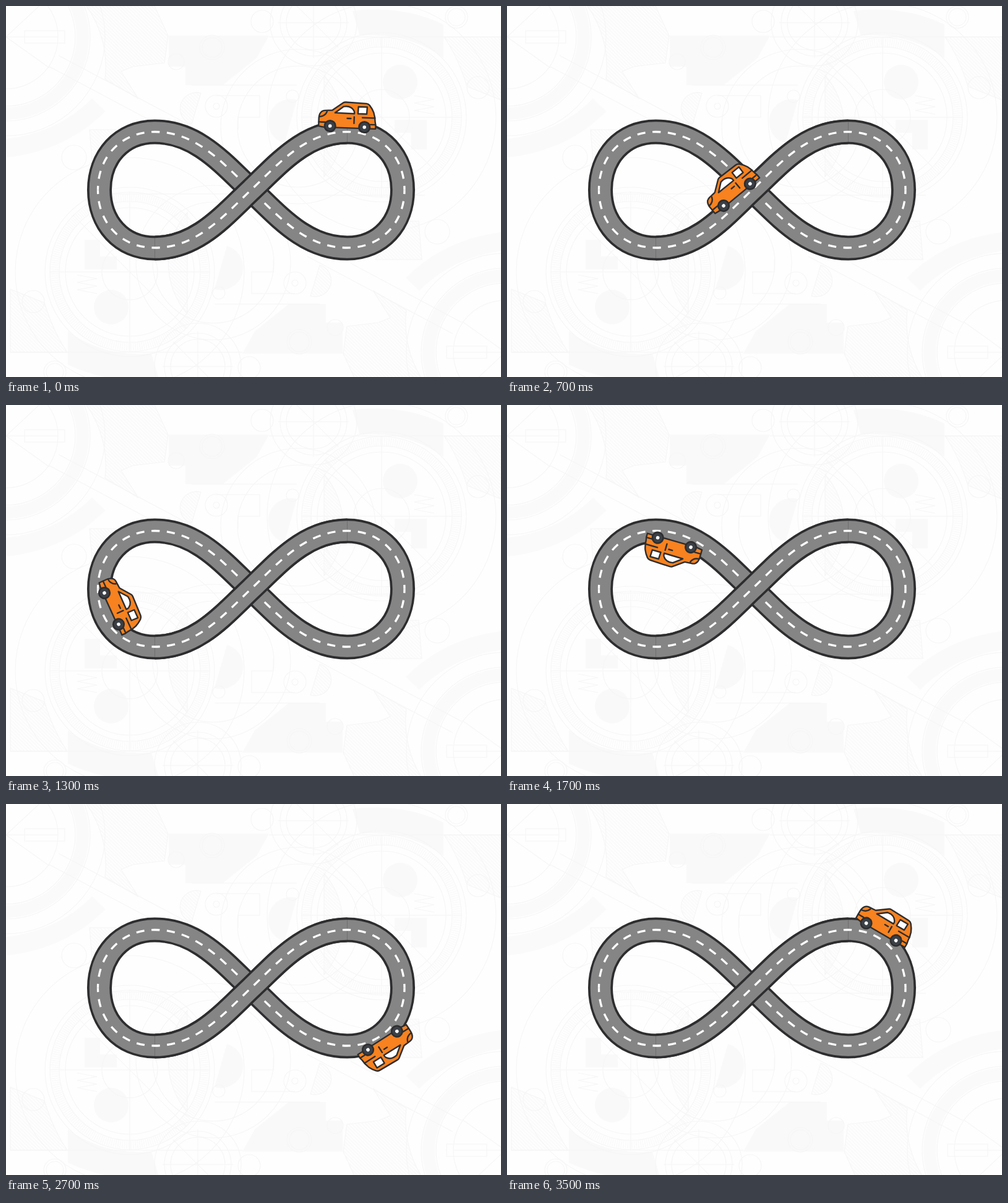
An HTML page for the animation above (3600 ms loop, 800x600 px).

```html
<!DOCTYPE html>
<html lang="en">
<head>
<meta charset="utf-8">
<title>Endless road</title>
<style>
  html, body { margin: 0; width: 100%; height: 100%; overflow: hidden; background: #fefefe; }
  svg { display: block; width: 800px; height: 600px; }
  .edge { fill: none; stroke: #2d2d2f; stroke-width: 40; }
  .tar { fill: none; stroke: #858585; stroke-width: 32.6; }
  .dash { fill: none; stroke: #fff; stroke-width: 3.3; stroke-dasharray: .53 .47; stroke-dashoffset: .265; }
  #car { stroke: #2d2d2f; stroke-width: 2.4; stroke-linejoin: round; stroke-linecap: round; }
  .body { fill: #f7821f; }
  .glass { fill: #fff; }
  .line { fill: none; }
  .tyre { fill: #3b4047; stroke-width: 2.6; }
  .hub { fill: #fff; stroke: none; }
  #gears { fill: none; stroke: #f6f6f6; stroke-width: 1.2; }
  #gears .fill { fill: #f9f9f9; stroke: none; }
  #gears .hatch { fill: url(#lines); }
  #gears .ring { stroke: #fafafa; }
</style>
</head>
<body>
<svg viewBox="0 0 800 600">
  <defs>
    <pattern id="lines" width="4" height="4" patternUnits="userSpaceOnUse" patternTransform="rotate(45)">
      <path d="M0 2H4" stroke="#f7f7f7" stroke-width="1.2"/>
    </pattern>
    <g id="gears">
      <path class="hatch" d="M130 0H240L262 48L256 92L205 98L186 106L214 150L160 118A170 170 0 0 0 130 0Z"/>
      <path class="hatch" d="M708 50H800V152L745 130Q730 82 708 50Z"/>
      <path class="hatch" d="M514 112A125 125 0 0 1 514 276Z"/>
      <path class="hatch" d="M315 141A26 26 0 1 0 300 191Z"/>
      <path class="hatch" d="M135 200H210L165 262H140Z"/>
      <path class="fill" d="M263 48H425L405 84L350 128H290V98H263Z"/>
      <path class="fill" d="M560 8Q640 -2 707 30V84Q650 42 572 48Z"/>
      <path class="fill" d="M628 184H680V232H655V205H628Z"/>
      <path class="fill" d="M470 152A36 36 0 0 0 450 222Z"/>
      <circle class="fill" cx="637" cy="123" r="28"/>
      <circle class="ring" cx="0" cy="50" r="124" stroke-width="20"/>
      <path class="ring" d="M0 230Q90 220 150 160" stroke-width="30"/>
      <path d="M85 80L320 205M70 98L250 194M0 50L60 -6M0 50L70 100M0 50H84M30 40H95V60H30Z"/>
      <path d="M425 50H800M300 128H470M130 304H400M340 145H410V180H375V200M660 145l32 6l-32 6l32 6l-32 6l32 6"/>
      <path d="M607 50V310M477 180H737M515 88L699 272M497 -30V84M440 27H554M457 -13L537 67"/>
      <circle class="ring" cx="607" cy="180" r="121" stroke-width="13" stroke-dasharray="1.5 2"/>
    </g>
  </defs>
  <use href="#gears"/>
  <use href="#gears" transform="rotate(180 403.5 305)"/>

  <path id="route" fill="none" d="M551.5 203.5C484 203.5 441 255 396 297.5S308 391.5 240.5 391.5C186 391.5 151 350 151 297.5S186 203.5 240.5 203.5C308 203.5 351 255 396 297.5S484 391.5 551.5 391.5C606 391.5 641 350 641 297.5S606 203.5 551.5 203.5Z"/>
  <use href="#route" class="edge"/>
  <use href="#route" class="tar"/>
  <path class="dash" pathLength="27" d="M148.5 297.5C148.5 245 185 203.5 240.5 203.5C308 203.5 351 255 396 297.5S484 391 551.5 391C607 391 644 350 644 297.5"/>
  <g id="bridge">
    <path class="edge" d="M240.5 391.5C308 391.5 351 340 396 297.5S484 203.5 551.5 203.5"/>
    <path class="tar" d="M240.5 391.5C308 391.5 351 340 396 297.5S484 203.5 551.5 203.5"/>
    <path class="dash" pathLength="27" d="M148.5 297.5C148.5 350 185 391 240.5 391C308 391 351 340 396 297.5S484 203.5 551.5 203.5C607 203.5 644 245 644 297.5"/>
  </g>

  <g id="car">
    <path class="body" d="M-46.3 .8V-12.5Q-46 -20 -42 -23Q-40 -24.6 -37 -24.8L-25 -25.6L-7.5 -38.4Q-6 -39.5 -3.5 -39.4L29.5 -38.2Q33 -38 35 -35.5Q39.5 -30 42 -24Q44.5 -17 44.8 -9L45.8 -4V2.2H-37Z"/>
    <path class="line" d="M-46 -14.5Q-36.5 -15 -33.5 -23M-46.3 -6H-36M37 -4.5H45.5M24 -15.2H44.3M10.7 -16V-5.5M-.5 -13.2H5.5"/>
    <path class="glass" d="M-20.5 -21.6L-6.8 -32.2Q5 -34.5 10 -26Q11 -24 10.8 -21.2Z"/>
    <path class="glass" d="M17 -32.6H31.2L30.8 -21.3H16.6Z"/>
    <circle class="tyre" cx="-27.8" r="8.8"/>
    <circle class="tyre" cx="27.8" r="8.8"/>
    <circle class="hub" cx="-27.8" r="2.8"/>
    <circle class="hub" cx="27.8" r="2.8"/>
  </g>
</svg>
<script>
const LOOP = 3600, STEP = 100, END_SPEED = 0.2;
const $ = id => document.getElementById(id);
const route = $('route'), car = $('car'), bridge = $('bridge'), gears = $('gears');
const total = route.getTotalLength();

// Background dials: centre x, y, radii
const dials = [
  [0, 50, 84, 112, 136, 160], [497, 27, 44, 54, 70], [607, 180, 45, 104, 114, 129, 137, 185],
  [472, 195, 98, 125], [333, 67, 16, 20], [414, 25, 18], [340, 162, 5, 18],
  [763, 132, 18], [728, 18, 14, 18], [463, 146, 10], [110, 245, 20], [275, 90, 13]
];
for (const [x, y, ...radii] of dials) for (const r of radii) {
  const c = document.createElementNS('http://www.w3.org/2000/svg', 'circle');
  c.setAttribute('cx', x);
  c.setAttribute('cy', y);
  c.setAttribute('r', r);
  gears.append(c);
}

// Time, front wheel x, y, rear wheel x, y
const wheels = [
  [0, 524, 194, 579.5, 196],
  [700, 349.5, 323.5, 393, 287.5],
  [1300, 159, 304, 182, 354.5],
  [1700, 297, 230, 243, 214.5],
  [2200, 464, 363, 420, 328.5],
  [2700, 632, 367.5, 585, 397.5],
  [3500, 581, 193, 629, 221]
];

const wrap = a => a - 2 * Math.PI * Math.round(a / (2 * Math.PI));
const at = s => route.getPointAtLength((s + total) % total);

// Point on the road and the angle pointing back along it
function spot(s) {
  const p = at(s), a = at(s - 1), b = at(s + 1);
  return { x: p.x, y: p.y, angle: Math.atan2(a.y - b.y, a.x - b.x) };
}

const track = [];
for (let s = 0; s < total; s++) track.push({ s, ...spot(s) });

// Express each pose as distance, lift above the road and extra tilt
const keys = wheels.map(([t, fx, fy, rx, ry], i) => {
  const x = (fx + rx) / 2, y = (fy + ry) / 2, angle = Math.atan2(ry - fy, rx - fx);
  let best, min = Infinity;
  for (const p of track) {
    const d = Math.hypot(p.x - x, p.y - y);
    if (d < min && Math.abs(wrap(p.angle - angle)) < 0.8) { min = d; best = p; }
  }
  const lift = (x - best.x) * Math.sin(best.angle) - (y - best.y) * Math.cos(best.angle);
  const s = i === 0 && best.s > total / 2 ? best.s - total : best.s;
  return { t, s, lift, tilt: wrap(angle - best.angle) };
});

const slope = i => (keys[i + 1].s - keys[i].s) / (keys[i + 1].t - keys[i].t);
keys.forEach((k, i) => {
  const end = i === 0 || i === keys.length - 1;
  k.speed = end ? END_SPEED : (slope(i - 1) + slope(i)) / 2;
});

function pose(t) {
  let i = 0;
  while (i < keys.length - 2 && t >= keys[i + 1].t) i++;
  const a = keys[i], b = keys[i + 1], span = b.t - a.t;
  const u = Math.min(1, (t - a.t) / span), v = 1 - u;
  const s = a.s * v * v * (1 + 2 * u) + b.s * u * u * (3 - 2 * u)
    + span * u * v * (a.speed * v - b.speed * u);
  const mix = name => a[name] * v + b[name] * u;
  const p = spot(s), lift = mix('lift');
  return {
    s,
    x: p.x + lift * Math.sin(p.angle),
    y: p.y - lift * Math.cos(p.angle),
    angle: p.angle + mix('tilt')
  };
}

const start = performance.now();
let under = false;
function draw() {
  const t = Math.floor(((performance.now() - start) % LOOP) / STEP) * STEP;
  const p = pose(t);
  car.setAttribute('transform', `translate(${p.x} ${p.y}) rotate(${p.angle * 180 / Math.PI})`);
  const below = p.s > total * 0.53 && p.s < total * 0.74;
  if (below !== under) {
    if (below) bridge.before(car); else bridge.after(car);
    under = below;
  }
  requestAnimationFrame(draw);
}
draw();
</script>
</body>
</html>
```
